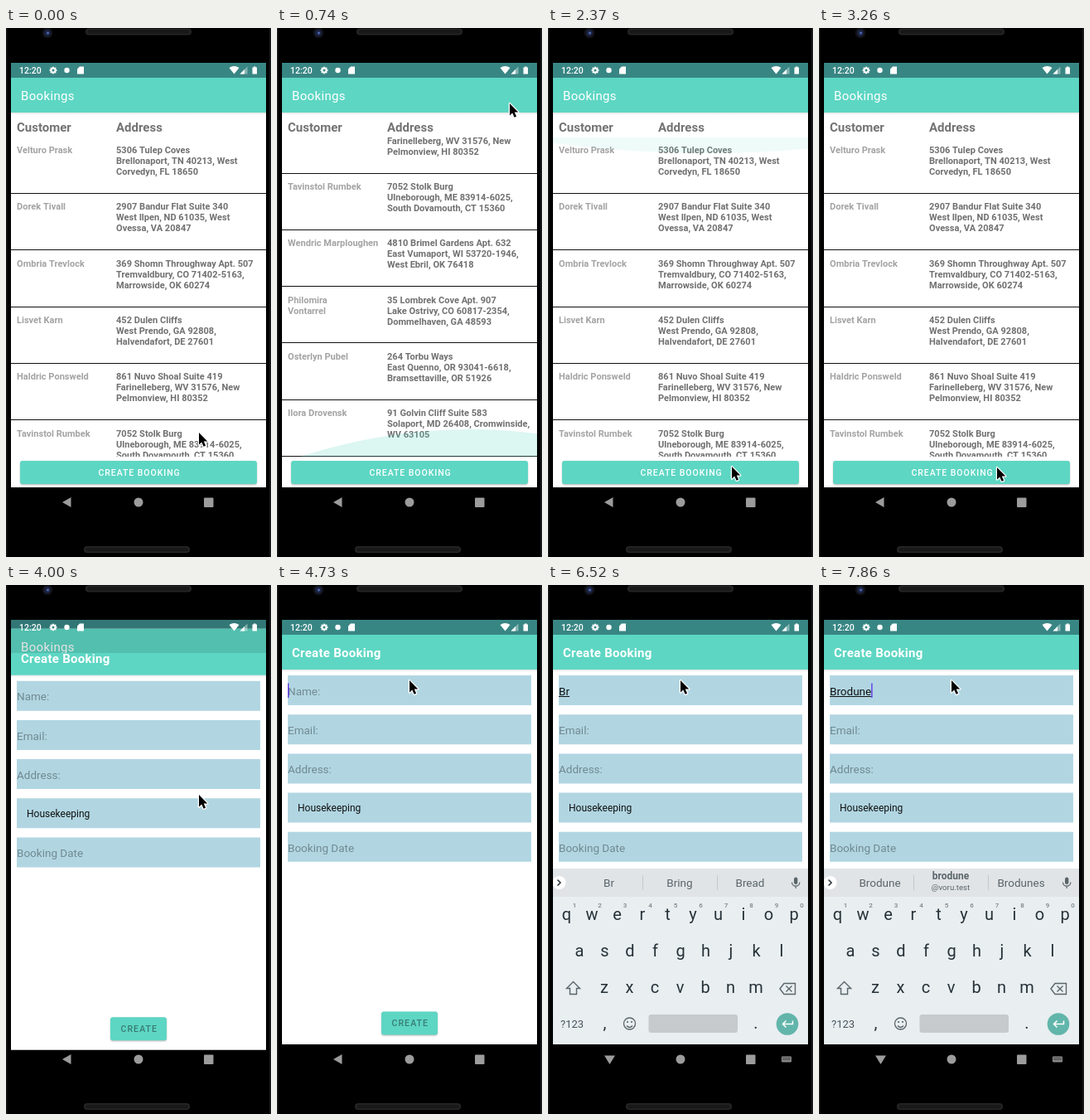
An HTML page with a canvas that plays this animation: 320x638 px, repeating every 8000 ms.

```html
<!DOCTYPE html>
<html lang="en">
<head>
<meta charset="utf-8">
<title>Bookings</title>
<style>
html, body { margin: 0; height: 100%; overflow: hidden; background: #000; }
canvas { display: block; }
</style>
</head>
<body>
<canvas id="stage" width="320" height="638"></canvas>
<script>
const ctx = document.getElementById('stage').getContext('2d');
const LOOP = 8000, STEPS = 54, STEP = LOOP / STEPS;
const TEAL = '#5dd6c3', DARK_TEAL = '#388684';
const LIST_TOP = 131, LIST_BOTTOM = 517, ROW = 68.27, MAX_SCROLL = 297.5;

const bookings = [
  ['Velturo Prask', '5306 Tulep Coves|Brellonaport, TN 40213, West|Corvedyn, FL 18650'],
  ['Dorek Tivall', '2907 Bandur Flat Suite 340|West Ilpen, ND 61035, West|Ovessa, VA 20847'],
  ['Ombria Trevlock', '369 Shomn Throughway Apt. 507|Tremvaldbury, CO 71402-5163,|Marrowside, OK 60274'],
  ['Lisvet Karn', '452 Dulen Cliffs|West Prendo, GA 92808,|Halvendafort, DE 27601'],
  ['Haldric Ponsweld', '861 Nuvo Shoal Suite 419|Farinelleberg, WV 31576, New|Pelmonview, HI 80352'],
  ['Tavinstol Rumbek', '7052 Stolk Burg|Ulneborough, ME 83914-6025,|South Dovamouth, CT 15360'],
  ['Wendric Marploughen', '4810 Brimel Gardens Apt. 632|East Vumaport, WI 53720-1946,|West Ebril, OK 76418'],
  ['Philomira|Vontarrel', '35 Lombrek Cove Apt. 907|Lake Ostrivy, CO 60817-2354,|Dommelhaven, GA 48593'],
  ['Osterlyn Pubel', '264 Torbu Ways|East Quenno, OR 93041-6618,|Bramsettaville, OR 51926'],
  ['Ilora Drovensk', '91 Golvin Cliff Suite 583|Solaport, MD 26408, Cromwinside,|WV 63105']
];

// Keyframes: [time, value, value...], eased inside each segment.
function track(t, keys) {
  let i = 0;
  while (i < keys.length - 2 && t > keys[i + 1][0]) i++;
  const [a, b] = [keys[i], keys[i + 1]];
  const p = Math.min(1, Math.max(0, (t - a[0]) / (b[0] - a[0])));
  const e = p * p * (3 - 2 * p);
  return a.slice(1).map((v, n) => v + (b[n + 1] - v) * e);
}

const pointerKeys = [[0, 232, 487], [740, 280, 90], [1185, 262, 190], [2000, 226, 510], [2370, 221, 528],
  [2667, 214, 529], [3408, 214, 529], [4000, 232, 252], [4592, 160, 113], [4740, 159, 114]];
const bottomGlowKeys = [[444, 0], [740, 1], [1185, 0]];
const topGlowKeys = [[1850, 0], [2074, 1], [2667, 0]];
const pressKeys = [[2667, 0], [2815, 1], [3259, 0]];
// New page offset, its clip edge, old page offset, old page dim
const openKeys = [[3704, 21, 500, -1, 0.02], [3852, 14, 180, -4, 0.08], [4000, 6.7, 82, -7.3, 0.11],
  [4148, 1.5, 48, -9, 0.12], [4296, 0, 42, -10, 0.12]];
const keyboardKeys = [[5185, 60, 0], [5333, 28, 0.4], [5481, 6, 0.87], [5629, 0, 1]];

function text(s, x, y, font, color, align = 'left', spacing = 0) {
  ctx.font = font + ' Roboto, sans-serif';
  ctx.fillStyle = color;
  ctx.textAlign = align;
  ctx.letterSpacing = spacing + 'px';
  ctx.fillText(s, x, y);
  return ctx.measureText(s).width;
}
function rect(x, y, w, h, color, radius = 0) {
  ctx.fillStyle = color;
  ctx.beginPath();
  ctx.roundRect(x, y, w, h, radius);
  ctx.fill();
}
function circle(x, y, r, color) {
  ctx.fillStyle = color;
  ctx.beginPath();
  ctx.arc(x, y, r, 0, 7);
  ctx.fill();
}
function shape(d, color) {
  ctx.fillStyle = color;
  ctx.fill(new Path2D(d));
}
function line(d, color, width = 1) {
  ctx.strokeStyle = color;
  ctx.lineWidth = width;
  ctx.stroke(new Path2D(d));
}
function clipped(x, y, w, h, draw) {
  ctx.save();
  ctx.beginPath();
  ctx.rect(x, y, w, h);
  ctx.clip();
  draw();
  ctx.restore();
}
function button(x, y, w, lift = 0) {
  ctx.save();
  ctx.shadowColor = 'rgba(0,0,0,.28)';
  ctx.shadowBlur = 2 + lift * 4;
  ctx.shadowOffsetY = 1 + lift;
  rect(x, y, w, 28, TEAL, 3);
  ctx.restore();
}

function phone() {
  rect(0, 0, 320, 638, '#000');
  rect(0, 0, 1.5, 638, '#161719');
  rect(318, 0, 2, 638, '#161719');
  circle(50, 6, 6.5, '#101116');
  circle(50, 6, 4, '#1c2340');
  circle(50.5, 6, 1.6, '#4c66b0');
  for (const [x, y] of [[96, 0.5], [94, 625]]) {
    rect(x, y, 128, 8, '#262626', 4);
    rect(x + 2, y + 1.5, 124, 5, '#191919', 3);
  }
}

function appBar(title, font, spacing) {
  rect(6, 42, 308, 530, '#fff');
  const shade = ctx.createLinearGradient(0, 102, 0, 105);
  shade.addColorStop(0, 'rgba(0,0,0,.1)');
  shade.addColorStop(1, 'rgba(0,0,0,0)');
  rect(6, 102, 308, 3, shade);
  rect(6, 42, 308, 18, DARK_TEAL);
  rect(6, 60, 308, 42, TEAL);
  text(title, 18, 87, font, '#fff', 'left', spacing);
}

function glow(x, edge, reach, height, strength) {
  if (strength <= 0) return;
  ctx.fillStyle = `rgba(93,214,195,${0.21 * strength})`;
  ctx.beginPath();
  ctx.moveTo(x - reach, edge);
  ctx.quadraticCurveTo(x, edge + 2 * height * strength, x + reach, edge);
  ctx.fill();
}

function listPage(t, pointerY) {
  appBar('Bookings', '15px', 0.35);
  text('Customer', 13, 125, 'bold 15px', '#737373');
  text('Address', 133, 125, 'bold 15px', '#737373');

  let scroll = MAX_SCROLL;
  if (t < 740) scroll = Math.min(scroll, 487 - pointerY);
  else if (t > 1185) scroll = Math.max(0, scroll - (pointerY - 190));

  clipped(6, LIST_TOP, 308, LIST_BOTTOM - LIST_TOP, () => {
    bookings.forEach(([name, address], i) => {
      const y = LIST_TOP + i * ROW - scroll;
      const column = (s, x, color) => s.split('|').forEach((part, n) =>
        text(part, x, Math.round(y + 20.2) + n * 13, 'bold 11.05px', color));
      column(name, 13, '#a3a3a3');
      column(address, 133, '#707070');
      rect(6, Math.floor(y + ROW + 0.25), 308, 1, '#111');
    });
    glow(233, LIST_BOTTOM, 205, -33, track(t, bottomGlowKeys)[0]);
    glow(190, LIST_TOP + 1, 230, 38, track(t, topGlowKeys)[0]);
  });

  const [press] = track(t, pressKeys);
  button(17, 522, 286, press);
  if (press > 0) clipped(17, 522, 286, 28, () =>
    circle(214, 536, 40 + (t - 2667) * 0.6, `rgba(255,255,255,${0.25 * press})`));
  text('CREATE BOOKING', 111.5, 540, '500 10.5px', '#fff', 'left', 0.94);
}

function formPage(step) {
  appBar('Create Booking', 'bold 15px', 0.28);
  const typed = typedText(step);
  ['Name:', 'Email:', 'Address:', 'Housekeeping', 'Booking Date'].forEach((label, i) => {
    const y = 109 + i * 47.2;
    rect(13, y, 294, 36, '#b1d6e2');
    if (i === 3) text(label, 25, y + 22.3, '12px', '#111');
    else if (i || !typed) text(label, 13, y + 23.7, '13.5px', '#718992');
  });
  let caret = 13;
  if (typed) {
    const width = text(typed, 13, 132.7, '13.5px', '#111');
    rect(13, 134, width, 1, '#111');
    caret += width;
  }
  const caretOn = step >= 32 && ![36, 37, 44, 45].includes(step);
  if (caretOn) rect(caret, 118.5, 1.3, 17.5, '#5b2ee8');
  button(126, 514.5, 68);
  text('CREATE', 138.5, 532.3, '500 10.5px', '#397c73', 'left', 1.1);
}

function typedText(step) {
  const strokes = [40, 41, 46, 47, 50, 51, 52];
  return 'Brodune'.slice(0, strokes.filter(s => step >= s).length);
}

function suggestions(step) {
  if (step < 40) return ['thanks', 'I', 'we'];
  if (step < 46) return ['Br', 'Bring', 'Bread'];
  if (step < 50) return ['Brod', 'Broad', 'Brook'];
  if (step < 53) return [typedText(step), 'Broad', 'Brodunes'];
  return ['Brodune', '', 'Brodunes'];
}

function keyboard(step) {
  const ink = '#263238', soft = '#5a656a', mid = 'center';
  rect(6, 342, 308, 34, '#e1e4e7');
  rect(6, 376, 308, 178, '#e9eef1');
  circle(13.5, 359, 8, '#fff');
  line('M11.5 355.5l3.5 3.5-3.5 3.5', ink, 1.5);
  rect(114, 350, 1, 18, '#c4c8cb');
  rect(204, 350, 1, 18, '#c4c8cb');
  suggestions(step).forEach((s, i) =>
    text(s, [73.5, 159, 244][i], 364.3, '13.5px', step < 40 ? '#798186' : soft, mid));
  if (step >= 53) {
    text('brodune', 159, 355.3, 'bold 12px', soft, mid);
    text('@voru.test', 159, 368, '9.7px', soft, mid);
  }
  rect(297, 352.5, 4.4, 8.5, soft, 2.2);
  line('M294.5 358.5a4.7 4.7 0 0 0 9.4 0M299.2 363v3', soft, 1.2);

  const row = (keys, x, y) => [...keys].forEach((key, i) =>
    text(key, x + i * 30.5, y, '20px', ink, mid));
  row('qwertyuiop', 22.5, 404);
  row('asdfghjkl', 38, 448);
  row('zxcvbnm', 68, 492);
  [...'1234567890'].forEach((n, i) => text(n, 32 + i * 30.5, 389, '500 8px', '#7b858a', mid));

  line('M30.5 478.5l-8 8h4v7h8v-7h4z', soft, 1.4);
  line('M280 487l5-6.5h13.5v13H285zM287.5 483.5l7 7m0-7l-7 7', soft, 1.4);
  text('?123', 15, 533.7, '13px', '#46535a');
  text(',', 68.5, 535, '20px', ink, mid);
  text('.', 251, 535, '20px', ink, mid);
  line('M91.5 529a7 7 0 1 0 14 0a7 7 0 1 0-14 0M95 531.5q3.5 4 7 0', soft, 1.3);
  circle(96, 527, 1.1, soft);
  circle(101, 527, 1.1, soft);
  rect(121.5, 518, 107.5, 22, '#c6cacd', 3);
  circle(289, 529.5, 13.3, '#62b5aa');
  line('M295.5 525.5v4h-12m4-4l-4 4 4 4', '#fff', 1.5);
}

function systemBars(keyboardOpen) {
  text('12:20', 16, 55, '500 10.5px', '#fff');
  circle(57, 51, 3.6, '#fff');
  for (let i = 0; i < 8; i++) {
    const a = i * Math.PI / 4;
    circle(57 + 3.6 * Math.cos(a), 51 + 3.6 * Math.sin(a), 1, '#fff');
  }
  circle(57, 51, 1.5, DARK_TEAL);
  circle(73.5, 51, 3.2, '#fff');
  shape('M89 46.5h5v9h-8v-6z', '#fff');
  shape('M269.5 48q6-4 12 0l-6 7.5z', '#fff');
  shape('M291.5 46.5v9h-9z', 'rgba(255,255,255,.4)');
  shape('M288 50v5.5h-5.5z', '#fff');
  shape('M297.5 47.5h1.5v-1h2.5v1h1.5v8h-5.5z', '#fff');

  const gray = '#9c9c9c';
  if (keyboardOpen) {
    shape('M68 567.5h13l-6.5 10.5z', gray);
    rect(282, 568.5, 12, 7, '#8a8a8a', 1);
    for (let x = 283.5; x < 293; x += 2) {
      rect(x, 570, 1, 1, '#000');
      rect(x, 572, 1, 1, '#000');
    }
  } else {
    shape('M68 572l10.5-6v12z', gray);
  }
  circle(160, 572, 5.5, gray);
  rect(239, 566.5, 11.5, 11.5, gray, 1);
}

function pointer(x, y) {
  ctx.save();
  ctx.translate(x, y);
  const arrow = 'M1 1v14.5l3.3-3 2.3 5.3 2.5-1-2.3-5.2h4.5z';
  ctx.lineJoin = 'round';
  line(arrow, '#fff', 2.4);
  shape(arrow, '#000');
  ctx.restore();
}

function draw(now) {
  const step = Math.min(STEPS - 1, Math.floor((now % LOOP + 12) / STEP));
  const t = step * STEP;
  const [px, py] = track(t, pointerKeys);
  const opening = step >= 25;
  const [newY, clipTop, oldY, dim] = track(t, openKeys);

  phone();
  if (step < 29) clipped(6, 42, 308, 512, () => {
    if (opening) ctx.translate(0, oldY);
    listPage(t, py);
    if (opening) rect(6, 42, 308, 530, `rgba(0,0,0,${dim})`);
  });
  if (opening) clipped(6, clipTop, 308, 554 + newY - clipTop, () => {
    ctx.translate(0, newY);
    formPage(step);
  });
  const keyboardOpen = step >= 36;
  if (keyboardOpen) {
    const [y, alpha] = track(t, keyboardKeys);
    clipped(6, 342, 308, 218, () => {
      ctx.translate(0, y);
      ctx.globalAlpha = alpha;
      keyboard(step);
    });
  }
  systemBars(keyboardOpen);
  pointer(px, py);
  requestAnimationFrame(() => draw(performance.now()));
}
draw(0);
</script>
</body>
</html>
```
